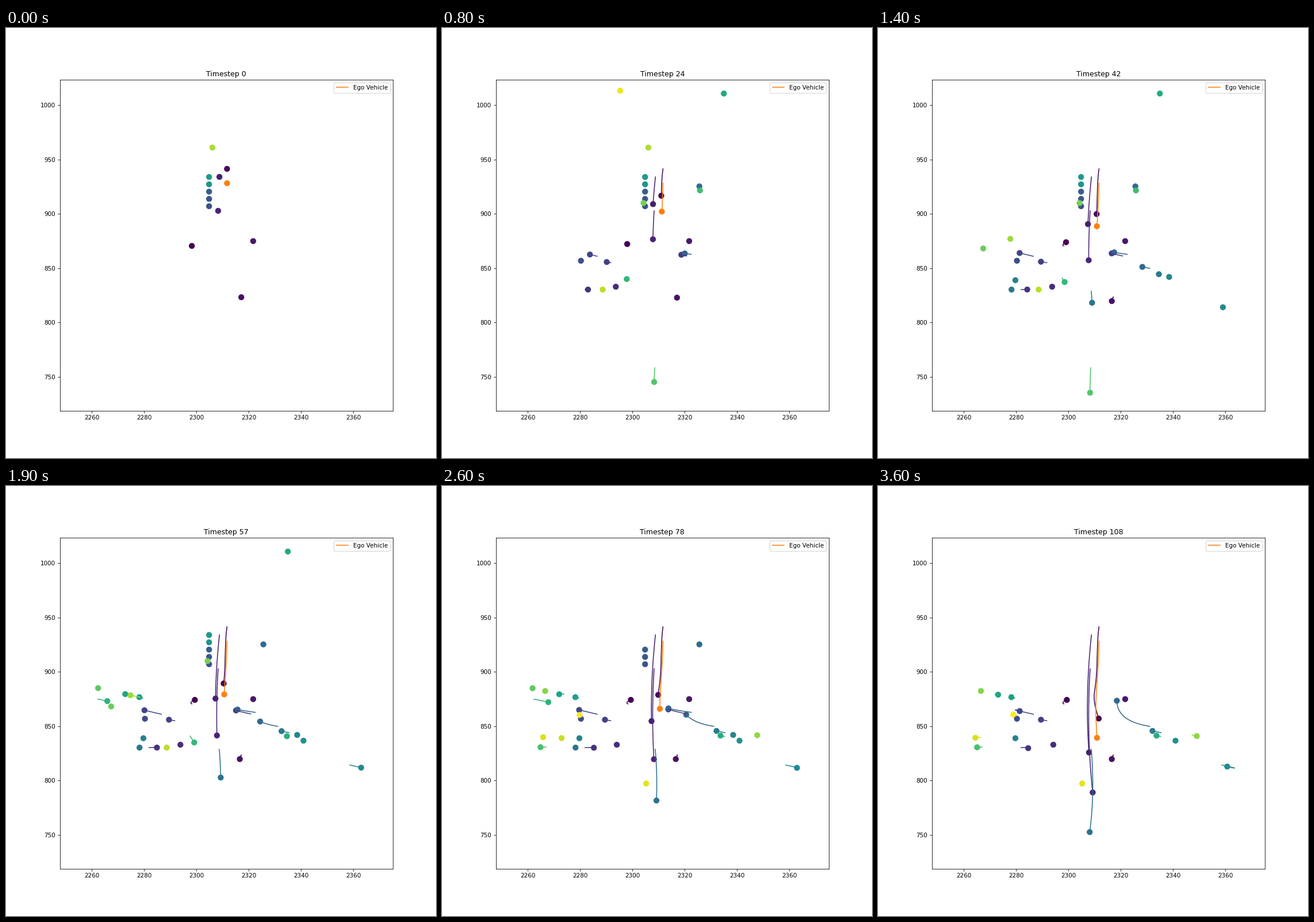
Recreate the animation shown at these times as a matplotlib script. Size 748 px wide and 748 px high, loop 3700 ms.

```python
import numpy as np
import matplotlib.pyplot as plt
from matplotlib.animation import FuncAnimation

FRAMES, STEP, INTERVAL = 37, 3, 100
END = (FRAMES - 1) * STEP
EGO = "#ff7f0e"

fig, ax = plt.subplots(figsize=(10, 10), dpi=74.8)
ax.set_xlim(2247.7, 2375.1)
ax.set_ylim(718.7, 1023.4)
title = ax.set_title("Timestep 0")

tracks = []


def drive(*points, born=0, gone=END, rest=None):
    """Polynomial path through evenly timed stage points, standing still after `rest`."""
    n = len(points)
    t = np.arange(born, gone + 1)
    u = np.clip((t - born) / ((rest or gone) - born), 0, 1)
    coef = np.polyfit(np.linspace(0, 1, n), np.array(points, float), n - 1)
    x, y = (np.vander(u, n) @ coef).T
    path = np.column_stack([2260 + (x - 149.5) / 4.55, 1000 - (y - 134) / 1.89])
    tracks.append((born, path))


def park(x, y, born=0, gone=END):
    drive((x, y), born=born, gone=gone)


def queue(places, gone):
    for place in places:
        park(353.3, 310 - 12.7 * place, gone=gone)


# The order of the road users sets their colour along the colormap.
drive((323.3, 379), (322, 376), (328.5, 372), rest=45)
drive((384.5, 245), (381.3, 297.5), (379, 340), (376, 366), (384, 404.5))
drive((409.3, 468.3), (409, 468.5), (406.7, 475), rest=42)
park(430, 370.7)
drive((371.3, 259), (364.5, 364), (367, 463.5))
drive((369, 318), (366.8, 428), (373.5, 533))
drive((302, 450), (305, 450), born=12)
drive((249, 455), (263, 455), (261.3, 456), born=12)
drive((425.5, 396.5), (400.5, 390.5), (390, 387), born=10, gone=102)
drive((293.5, 408.3), (283.5, 406.5), born=6, rest=32)
drive((270, 397), (240.5, 390), (246.5, 391.5), born=9)
park(241.7, 404.8, born=9)
queue(range(3), gone=87)
drive((433.5, 393.7), (407.5, 389.7), (391, 386), born=9, gone=87)
drive((472.7, 418), (430, 402.5), (415.5, 373.5), born=33)
park(447.7, 275.5, born=6, gone=87)
drive((371, 458), (373.5, 532), (368.3, 602), born=32)
park(232.3, 455, born=27, gone=102)
drive((492.3, 429), (477.5, 426), born=36, rest=60)
park(239, 438.7, born=30)
park(506.5, 433, born=39, gone=102)
drive((598, 485.3), (620, 490.5), (614, 489.5), (607.5, 488), born=41)
park(517.5, 443, born=51)
queue(range(3, 5), gone=68)
drive((238, 369), (232, 367.3), born=48, rest=57)
drive((212, 361.8), (204, 362.2), (209, 363), born=45)
park(490.3, 114, born=9, gone=66)
drive((491.5, 436), (484.5, 434.2), born=48, rest=70)
drive((160, 370.7), (185, 376), born=44, gone=84, rest=64)
drive((320.3, 435), (328, 447), born=18, gone=72, rest=60)
park(448.7, 282.5, born=12, gone=51)
drive((181, 454), (168, 454.5), (172.5, 454.5), born=66)
drive((370, 591), (369, 621), (369, 648), born=2, gone=56)
drive((161, 351.5), (154.5, 352), born=51, gone=102)
park(183, 383.5, born=33, gone=66)
park(350.6, 304.5, born=15, gone=69)
drive((176, 355), (181.5, 357.5), (179, 356.5), born=69)
drive((546.5, 433), (554.5, 435), born=69)
drive((233, 367.3), (216.5, 364), born=39, gone=69, rest=57)
park(359, 208, gone=33)
park(279.5, 455, born=15, gone=69)
park(208, 438.4, born=72, gone=102)
drive((179, 437), (173, 437.2), (169.5, 438), born=69)
park(355.2, 517.5, born=66)
park(310, 109, born=9, gone=33)
drive((240.5, 398.5), (235.3, 397.5), born=69)

colors = list(plt.get_cmap("viridis")(np.linspace(0, 1, len(tracks)))) + [EGO]
drive((384.5, 270), (381.3, 337), (379, 380), (381, 438))

trails = [ax.plot([], [], color=c)[0] for c in colors]
dots = ax.scatter([], [], s=80)
ax.legend(trails[-1:], ["Ego Vehicle"], loc="upper right")


def draw(frame):
    now = frame * STEP
    spots, fills = [], []
    for (born, path), color, trail in zip(tracks, colors, trails):
        n = now - born + 1
        shown = path[:n] if 0 < n <= len(path) else path[:0]
        trail.set_data(*shown.T)
        if len(shown):
            spots.append(shown[-1])
            fills.append(color)
    dots.set_offsets(spots)
    dots.set_color(fills)
    title.set_text(f"Timestep {now}")
    return [dots, title, *trails]


anim = FuncAnimation(fig, draw, frames=FRAMES, interval=INTERVAL, repeat=True, repeat_delay=0)
plt.show()
```
